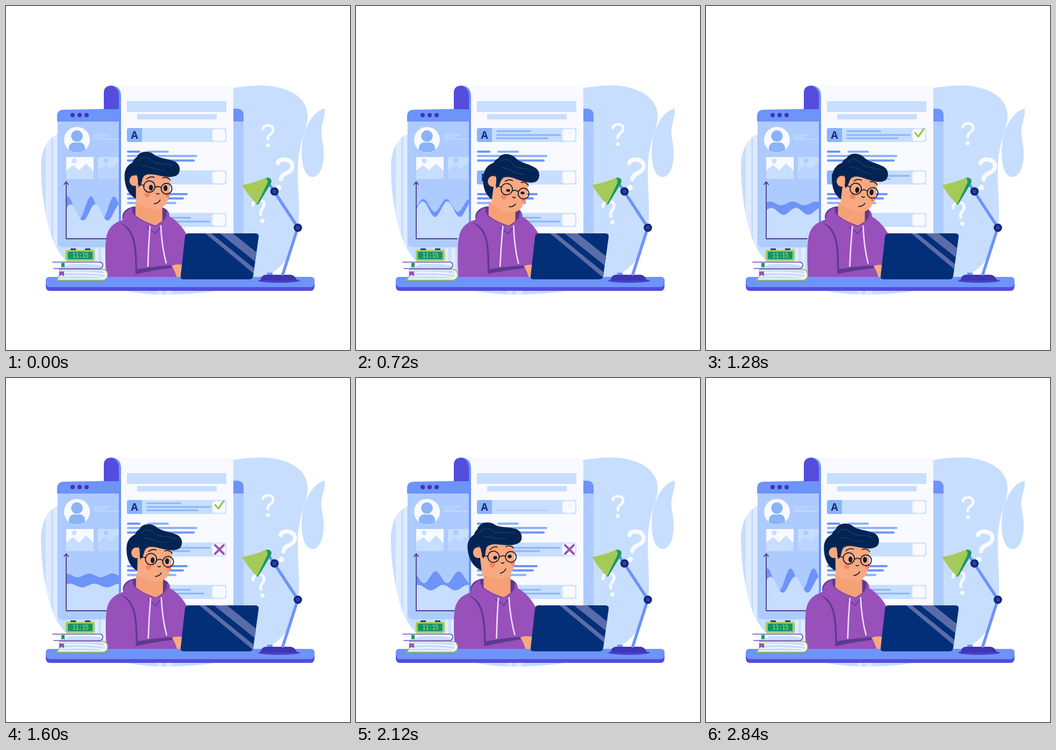
These frames come from a looping animation (640 px wide and 640 px high, 2880 ms). An HTML page:

```html
<!DOCTYPE html>
<html lang="en">
<head>
<meta charset="utf-8">
<title>Online test</title>
<style>
html,body{margin:0;width:100%;height:100%;overflow:hidden;background:#fff}
svg{display:block;width:100%;height:100%}
.r{fill:none;stroke-linecap:round;stroke-linejoin:round}
</style>
</head>
<body>
<svg viewBox="0 0 640 640">
<defs>
  <clipPath id="chartClip"><rect x="113" y="330" width="97" height="102"/></clipPath>
  <clipPath id="screenClip"><path d="M339 423H464Q471 423 470 430L460 502Q459 508.500 453 508.500H330Q324 508.500 325 502L333 429Q334 423 339 423Z"/></clipPath>
  <clipPath id="blobClip"><path id="blobPath" d="M97 238C76 246 65 270 65 300C65 345 72 385 82 420C92 455 110 480 150 505C185 524 235 537 300 537C335 537 370 533 396 529L488 500C520 485 541 450 545 395C546 360 542 330 543 300C544 250 562 230 561 203C560 165 515 146 466 148Q440 149 415 154L300 240Z"/></clipPath>
  <g id="ask" class="r" stroke="#f8faff">
    <path d="M-9-11C-10-19 11-22 10-9C9-1-1-1 0 8"/><path d="M0 19v.1" stroke-width="7"/>
  </g>
</defs>

<use href="#blobPath" fill="#c7deff"/>
<g clip-path="url(#blobClip)" fill="#dfecff">
  <path d="M74 220h10v320h-10zM88 220h7v320h-7zM166 440h6v100h-6zM177 440h8v100h-8zM281 525h9v20h-9zM297 525h13v20h-13z"/>
</g>
<path d="M593 191C572 194 550 230 550 270C550 300 557 318 571 318C585 317 592 295 591 270C590 250 584 240 588 222C591 210 594 200 593 191Z" fill="#c7deff"/>

<path d="M96 214H442V440Q442 449 433 449H106Q96 449 96 438Z" fill="#aecbff"/>
<path d="M95 215V204Q96 193 107 193L210 191H431Q442 192 442 203V215Z" fill="#6e93f9"/>
<g fill="#3f35b5"><circle cx="124" cy="203" r="4"/><circle cx="137" cy="203" r="4"/><circle cx="150" cy="203" r="4"/></g>
<circle cx="132" cy="249" r="24" fill="#f8faff"/>
<path d="M117 268C116 257 122 253 132 253S148 257 147 268Q132 277 117 268Z" fill="#8ab4f8"/>
<circle cx="132" cy="242" r="11.5" fill="#8ab4f8" stroke="#f8faff" stroke-width="1.5"/>
<path d="M163 240h30M163 244h22M163 248h47" stroke="#c7deff" stroke-width="1.6"/>
<path d="M112 281h51v41h-51z" fill="#f8faff"/>
<path d="M112 306L125 296L136 306L149 293L163 307V322H112Z" fill="#c7deff"/><circle cx="127" cy="288" r="4.5" fill="#c7deff"/>
<path d="M171 281h40v41h-40z" fill="#c7deff"/><path d="M171 307L184 295L195 303L210 291V322H171Z" fill="#bad4ff"/><circle cx="186" cy="288" r="4.5" fill="#aecbff"/>
<g clip-path="url(#chartClip)"><path id="back" fill="#6e93f9"/><path id="front" fill="#c7deff"/></g>
<path class="r" d="M108 332L112 327L116 332M112 328V433H188" stroke="#4d3a8c" stroke-width="1.8"/>

<path d="M182 192V160Q183 148 197 148Q213 150 214 166V192Z" fill="#544ddd"/>
<path d="M196 148H414Q423 149 423 159V470H211V166Q211 149 196 148Z" fill="#f8faff"/>
<path d="M196 148Q214 149 214 168V448H210V168Q210 152 196 148Z" fill="#6e93f9"/>
<path d="M225 177h185v20h-185zM244 201h148v10h-148z" fill="#c7deff"/>
<g id="rows"></g>
<g class="r" stroke-width="4">
  <path d="M227 271H248M227 287.500H349M227 350H336M227 358H329" stroke="#6e93f9"/>
  <path d="M265 271H301M227 279H354M227 366.500H315" stroke="#8ab4f8"/>
</g>
<path id="tick" class="r" d="M-8-1L-2 6L8-8" stroke="#9bc34d" stroke-width="3.3"/>
<path id="cross" class="r" d="M-8-8L8 8M8-8L-8 8" stroke="#9850bb" stroke-width="4"/>

<use id="q1" href="#ask" stroke-width="4.800"/>
<use id="q2" href="#ask" stroke-width="5.400"/>
<use id="q3" href="#ask" stroke-width="5"/>

<g id="body">
  <path d="M187 510C184 470 184 440 188 425C193 408 205 402 220 397L302 390C325 402 338 425 348 450L340 510Z" fill="#9850bb"/>
  <path d="M218 400C213 389 220 376 238 373L292 375C303 379 306 388 303 396L279 410Q240 400 218 400Z" fill="#5c3a8f"/>
  <path d="M241 366V390Q258 404 278 409L291 400V366Z" fill="#f6a076"/>
  <g id="head">
    <path d="M241 358C226 350 220 332 221 313C222 300 230 293 240 289L262 300L252 355Z" fill="#032453"/>
    <path d="M242 312C260 300 295 305 304 315C307 330 306 350 300 364C294 377 281 380 268 377L242 368Z" fill="#f8a981"/>
    <ellipse cx="239" cy="325" rx="9" ry="10" fill="#f8a981"/>
    <path d="M245 318C236 304 230 290 244 281C247 271 263 268 274 275C284 284 298 283 310 288C324 291 327 306 320 314C311 321 296 318 282 315C270 312 260 312 256 318C252 325 254 333 247 337Z" fill="#032453"/>
    <path class="r" d="M247 289C255 276 266 283 273 289C284 297 300 291 311 297M252 297C265 296 278 306 295 305" stroke="#174779" stroke-width="1"/>
    <g fill="#f58368"><circle cx="263" cy="351" r="5"/><ellipse cx="301" cy="352" rx="4" ry="4.500"/></g>
    <g fill="#111a30"><ellipse class="eye" cx="270" cy="338" rx="3.700"/><ellipse class="eye" cx="297" cy="339" rx="3.700"/></g>
    <g class="r" stroke="#151a2c" stroke-width="1.7">
      <circle cx="267" cy="336" r="10.500"/><circle cx="299" cy="340" r="10"/><path d="M277.500 338Q283 334 289 338M257 334L246 331"/>
      <path d="M262 322Q269 316 276 319M292 320Q300 317 306 324M280 349Q283 351 285 349M276 368Q284 367 287 361"/>
    </g>
  </g>
  <path d="M218 400C216 388 225 379 235 375C229 393 260 402 279 409C288 405 300 396 299 380C305 386 306 397 301 405Q294 417 278 424Q246 417 228 401Z" fill="#9850bb"/>
  <path d="M235 378Q234 394 278 409Q296 401 300 388" class="r" stroke="#7d42a6" stroke-width="1.500"/>
  <path d="M263 412L278 423L289 409" class="r" stroke="#5c3a8f" stroke-width="1.500"/>
  <path d="M211 403C238 411 244 438 244 490Q280 483 326 481V485Q280 490 241 499C240 445 239 419 211 403Z" fill="#5c3a8f"/>
  <g class="r" stroke="#ecd9f7" stroke-width="2.700"><path d="M268 410Q265 448 264 484"/><path d="M288 409Q290 448 298 478"/></g>
  <path d="M308 483Q318 479 330 482V506H318Q315 493 308 483Z" fill="#f8a981"/>
</g>

<path d="M74 511Q74 504 82 504H566Q574 504 574 511V521Q574 530 566 530H82Q74 530 74 521Z" fill="#544ddd"/>
<path d="M74 513Q74 504 82 504H566Q574 504 574 513Q574 523 566 523H82Q74 523 74 513Z" fill="#6e93f9"/>

<g clip-path="url(#screenClip)">
  <path d="M320 420h155v92h-155z" fill="#022f78"/>
  <path id="glint" d="M-5 419H6L120 512H107ZM22 419H46L162 512H138Z" fill="#5a6ca9"/>
</g>

<path d="M486 496h10v6h-10z" fill="#6e93f9"/>
<ellipse cx="508" cy="511" rx="39" ry="4" fill="#4a43ca"/>
<path d="M474 511Q474 501 483 500H530Q539 502 541 511Z" fill="#3f35b5"/>
<path class="r" d="M515 499L543 412L499 345" stroke="#6e93f9" stroke-width="5.500"/>
<path class="r" d="M499 345L488 329" stroke="#6e93f9" stroke-width="5"/>
<path d="M480 322Q486 317 492 321Q496 326 491 333L470 368Q468 371 465 368Z" fill="#169a63"/>
<path d="M439 333Q462 329 483 320Q488 323 486 330L467 369Q451 353 439 333Z" fill="#a6ca58"/>
<g fill="#3f35b5" stroke="#062b70" stroke-width="4"><circle cx="499.500" cy="345" r="5.800"/><circle cx="543" cy="412.500" r="5.800"/></g>

<path d="M100 490H180Q189 491 189 500T180 510H95L99 502Z" fill="#f8faff" stroke="#9bc34d" stroke-width="1.800"/>
<path d="M98 492H178Q184 494 184 500T177 507H98Z" fill="#c7deff"/>
<path d="M106 496Q150 494 183 499M102 503Q150 500 182 505" class="r" stroke="#f8faff" stroke-width="2"/>
<path d="M99 494h9v9l-4.500-3l-4.500 3z" fill="#9850bb"/>
<path d="M87 477H176Q181 482 176 488H87Q92 483 87 477Z" fill="#f8faff"/>
<path d="M115 481Q150 477 178 483V487H92Q112 487 115 481Z" fill="#c7deff"/>
<path class="r" d="M87 476.500H175Q180 477 180 482T175 488.500H89" stroke="#6d45b4" stroke-width="1.600"/>
<path d="M103 478h6v9l-3-2l-3 2z" fill="#169a63"/>
<path d="M120 451h10v4h-10zM147 451h10v4h-10z" fill="#243c91"/>
<rect x="111" y="454" width="54" height="20" rx="4" fill="#a6ca58"/>
<rect x="115" y="457" width="46" height="14" rx="2" fill="#14946a"/>
<text x="138" y="468.300" text-anchor="middle" font-family="'DejaVu Sans Mono',monospace" font-size="11.500" letter-spacing="-.9" fill="#b2dc70">11:15</text>
</svg>
<script>
const LOOP = 2880;
const $ = id => document.getElementById(id);
const set = (el, name, v) => el.setAttribute(name, v);
const clamp = v => Math.max(0, Math.min(1, v));
const ease = v => (1 - Math.cos(Math.PI * clamp(v))) / 2;
const ramp = (t, a, b) => ease((t - a) / (b - a));
const wrap = t => (t % LOOP + LOOP) % LOOP;

// ends: y offset and right end of each line, drawn one after another from "on", faded from "off"
const rows = [
  { name: 'A', y: 227, on: 0, off: 1560, ends: [[6, 326], [13, 381], [19, 358]] },
  { name: 'B', y: 306, on: 850, off: 2380, ends: [[10, 380], [16, 343]] },
  { name: 'C', y: 385, on: 1280, off: 780, ends: [[9, 344], [16, 380]] }
];
$('rows').innerHTML = rows.map(r => `
  <rect x="225" y="${r.y}" width="185" height="26" rx="4" fill="#c7deff"/>
  <path d="M229 ${r.y}H253v26H229q-4 0-4-4v-18q0-4 4-4Z" fill="#8ab4f8"/>
  <text x="239" y="${r.y + 19.5}" text-anchor="middle" font-family="'Noto Sans','Open Sans',sans-serif" font-weight="700" font-size="19" fill="#172a78">${r.name}</text>
  <rect x="384" y="${r.y + 2}" width="24" height="22" rx="4" fill="#f8faff" stroke="#e4efff"/>`).join('');

const lines = rows.flatMap(r => r.ends.map(([dy, end], i) => {
  const el = document.createElementNS('http://www.w3.org/2000/svg', 'path');
  set(el, 'class', 'r');
  set(el, 'stroke', '#8ab4f8');
  set(el, 'stroke-width', 3);
  $('rows').append(el);
  return { el, y: r.y + dy, end, on: r.on + 160 * i, off: r.off + 200 * i };
}));
const eyes = document.querySelectorAll('.eye');

function wave(mean, amp, peak, length) {
  let d = 'M112 433';
  for (let x = 112; x <= 211; x += 3)
    d += `L${x} ${mean - amp * Math.cos(2 * Math.PI * (x - peak) / length)}`;
  return d + 'V433Z';
}

// Leans right until 970 ms, then back until 2200 ms
function lean(t) {
  const s = t < 970 || t >= 2200 ? ease(wrap(t - 2200) / 1650) : 1 - ease((t - 970) / 1230);
  return (s - 0.375) / 0.6;
}

function mark(id, x, y, s) {
  set($(id), 'transform', `translate(${x} ${y}) scale(${s})`);
  set($(id), 'visibility', s > 0.01 ? 'visible' : 'hidden');
}

function drawLine(l, t) {
  const age = wrap(t - l.on), hold = wrap(l.off - l.on);
  const w = ease(age / 200), fade = 1 - ease((age - hold) / 260);
  set(l.el, 'd', `M262.5 ${l.y}H${262.5 + (l.end - 264) * w}`);
  set(l.el, 'opacity', w > 0.01 ? fade : 0);
}

function draw(t) {
  const a = 2 * Math.PI * t / LOOP;
  const sin = Math.sin(a), cos = Math.cos(a);

  const p = lean(t);
  set($('body'), 'transform', `translate(${4 * p} 0) rotate(${0.9 * p} 260 503)`);
  set($('head'), 'transform', `rotate(${9 * p - 2 * p * p} 232 400)`);
  const blink = Math.exp(-(((t % 1440 - 715) / 60) ** 2));
  eyes.forEach(e => set(e, 'ry', 5.5 - 3 * blink));

  lines.forEach(l => drawLine(l, t));
  mark('tick', 397, 237, ramp(t, 660, 940) * (1 - ramp(t, 1900, 2200)));
  mark('cross', 397, 319, ramp(t, 1260, 1540) * (1 - ramp(t, 2460, 2760)));

  set($('back'), 'd', wave(371 + 4 * cos, 12 + 9 * cos, 158 + 10 * sin, 43));
  set($('front'), 'd', wave(384 - 6 * sin, 10 + 7 * Math.cos(a - 0.7), 166 + 4 * sin, 46));
  set($('glint'), 'transform', `translate(${371 - 5 * sin - 13 * Math.sin(2 * a) + 5 * Math.sin(3 * a)} 0)`);

  const k = (1 - cos) / 2;
  set($('q1'), 'transform', `translate(487 ${240 - 4 * k})`);
  set($('q2'), 'transform', `translate(${514.5 + 5 * k} 311) rotate(15) scale(1.45)`);
  set($('q3'), 'transform', `translate(472 ${380 + 5 * k}) rotate(-14) scale(1.08)`);
}

function tick(now) {
  draw(now % LOOP);
  requestAnimationFrame(tick);
}
draw(0);
requestAnimationFrame(tick);
</script>
</body>
</html>
```
